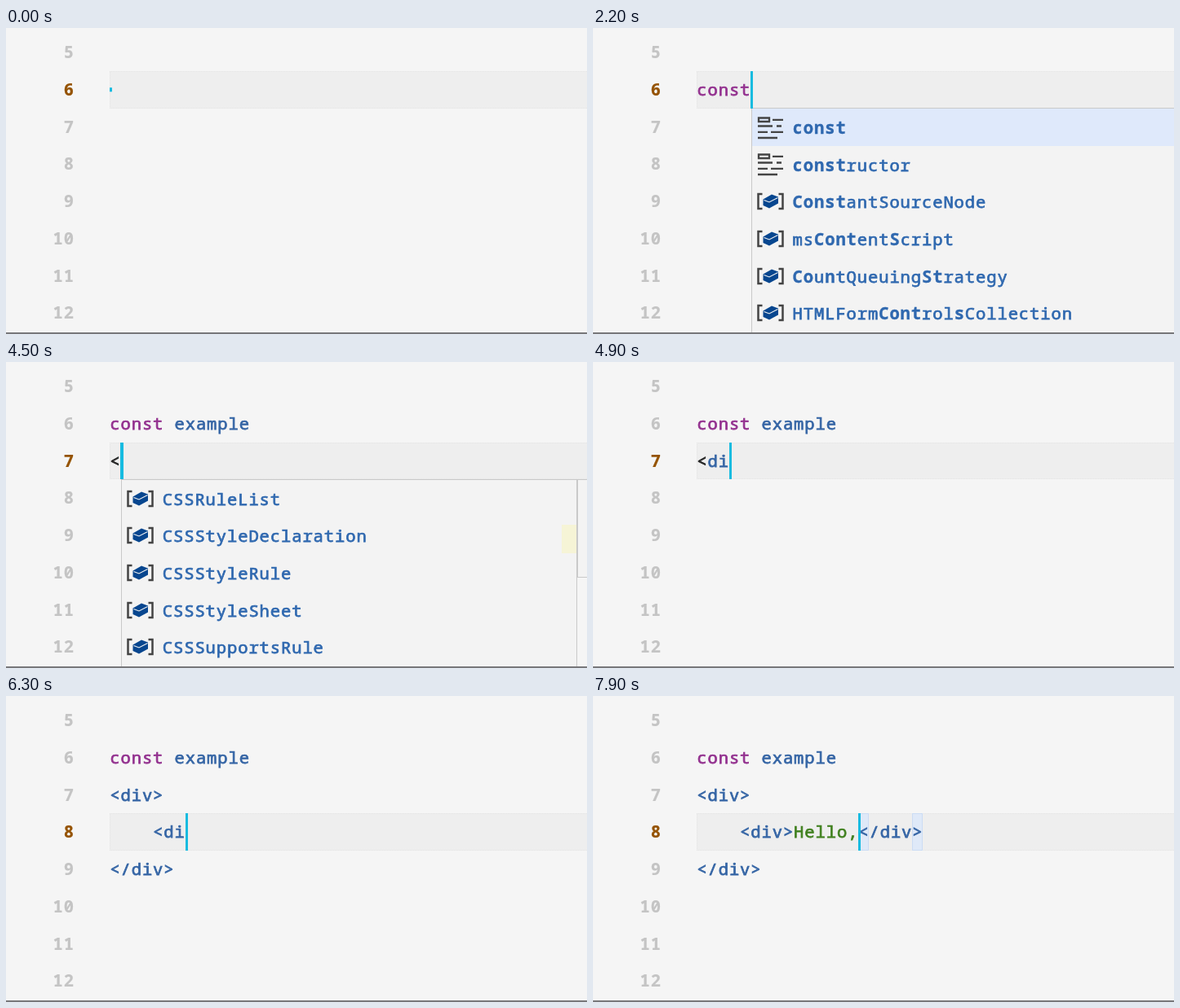
Write an HTML page that moves like this. It is 712 px wide and 376 px high and loops after 8000 ms.

```html
<!DOCTYPE html>
<html lang="en">
<head>
<meta charset="utf-8">
<title>Code editor</title>
<style>
html, body { margin: 0; width: 100%; height: 100%; overflow: hidden; background: #f5f5f5; }
#stage { position: relative; width: 712px; height: 376px; overflow: hidden; background: #f5f5f5;
  font: 500 20.5px/45.7px "Noto Sans Mono", "DejaVu Sans Mono", monospace; letter-spacing: .9px;
  font-variant-ligatures: none; }
#stage div, #stage svg { position: absolute; box-sizing: border-box; }
.t { white-space: pre; height: 45.7px; -webkit-text-stroke: .75px currentColor; }
.num { right: 628px; font-weight: 600; color: #c4c4c4; -webkit-text-stroke-width: .2px; }
.num.on { color: #955300; }
.row { left: 127px; right: 0; height: 45.7px; background: #eee;
  border: dotted #e4e4e4; border-width: 1px 0 1px 1px; }
.cur { width: 3.3px; height: 45.5px; background: #16bbe0; }
.pair { width: 13.2px; height: 45.7px; background: #dfe9f8; border: 1px solid #cbdcf4; }
.pop { width: 559px; height: 400px; background: #f3f3f3; border: 1px solid #c9c9c9; }
.pick { left: 0; right: 0; top: 0; height: 46px; background: #dfe9fb; }
.pop .t { color: #2f68af; }
.pop b { font-weight: 700; -webkit-text-stroke-width: .35px; }
.note { left: 699px; width: 30px; height: 121px; background: #f3f3f3; border: 1px solid #c9c9c9; border-left-width: 2px; }
.foot { left: 0; top: 374px; width: 712px; height: 2px; background: #77777a; }
.k { color: #93318f; } .v { color: #3565a5; } .s { color: #40801f; } .p { color: #222; }
</style>
</head>
<body>
<div id="stage"></div>
<script>
const CW = 13.2, LH = 45.7, LEFT = 127, LOOP = 8000;
const stage = document.getElementById('stage');
const rowTop = n => 53 + (n - 6) * LH;
const colX = c => LEFT + c * CW;

const esc = s => s.replace(/</g, '&lt;');
const ink = (cls, s) => `<span class="${cls}">${esc(s)}</span>`;
const box = (cls, x, y, body = '', extra = '') =>
  `<div class="${cls}" style="left:${x}px;top:${y}px;${extra}">${body}</div>`;

const icons = {
  cube: `<path d="M14.5 1 27 8v15l-12.500 8L2 23V8zM2 8l12.500 7.500L27 8M14.500 15.500V31"
    fill="none" stroke="#55167f" stroke-width="2.4" stroke-linejoin="round"/>`,
  brick: `<path d="M6.500 7H1.500V25H6.500M26.500 7H31.500V25H26.500" fill="none" stroke="#444" stroke-width="2.5"/>
    <path d="M7.500 13.500 18 7.500 26 10.500v8L15 24.500 7.500 21z" fill="#07468f"/>
    <path d="M8.500 14.500 15 17 25.500 11.500" fill="none" stroke="#f3f3f3" stroke-width="1.1"/>`,
  lines: `<path d="M2 4.500H15V9H2zM19 6.800H32M1 14.500H19M24 14.500H30M1 21.800H13M17 21.800H32M1 29H25"
    fill="none" stroke="#444" stroke-width="2.3"/>`
};

// Each list row: icon, then a label with *matched* letters.
const lists = {
  co: ['cube *co*nfirm', 'brick *co*nsole', 'lines *co*nst', 'lines *co*nstructor', 'lines *co*ntinue', 'brick *Co*mment'],
  con: ['cube *con*firm', 'brick *con*sole', 'lines *con*st', 'lines *con*structor', 'lines *con*tinue', 'brick *Con*stantSourceNode'],
  const: ['lines *const*', 'lines *const*ructor', 'brick *Const*antSourceNode', 'brick ms*Cont*ent*S*cript',
    'brick *Co*u*n*tQueuing*St*rategy', 'brick HTMLForm*Cont*rol*s*Collection'],
  cons: ['brick *cons*ole', 'lines *cons*t', 'lines *cons*tructor', 'brick *Cons*tantSourceNode',
    'brick ms*Con*tent*S*cript', 'brick *Co*u*n*tQueuing*S*trategy'],
  css: ['brick CSSRuleList', 'brick CSSStyleDeclaration', 'brick CSSStyleRule', 'brick CSSStyleSheet', 'brick CSSSupportsRule']
};

function popup(name, line, col) {
  const items = lists[name].map((item, i) => {
    const [icon, label] = item.split(' ');
    const y = i * LH;
    return `<svg width="33" height="33" style="left:6.5px;top:${y + 6.5}px">${icons[icon]}</svg>` +
      box('t', 50, y + .6, label.replace(/\*(.+?)\*/g, '<b>$1</b>'));
  });
  const pick = name === 'css' ? '' : '<div class="pick"></div>';
  return box('pop', colX(col) + .6, rowTop(line + 1) - .4, pick + items.join(''));
}

function squiggle(line, col, n) {
  const w = n * CW, y = rowTop(line + 1) - 6;
  let d = 'M0 4';
  for (let x = 0; x <= w; x++) d += `L${x} ${(4 + 2 * Math.cos(x / CW * 2 * Math.PI)).toFixed(1)}`;
  return `<svg width="${w}" height="8" style="left:${colX(col)}px;top:${y}px">
    <path d="${d}" fill="none" stroke="#bd3428" stroke-width="1.7"/></svg>`;
}

const decl = ink('k', 'const') + ink('v', ' example');
const open = ink('v', '<div>'), close = ink('v', '</div>');
const inner = s => ({ 6: decl, 7: open, 8: '    ' + s, 9: close });
const hello = (s, at, more = {}) => [at, 8, 9 + s.length,
  inner(open + ink('s', s) + close), { pairs: [9 + s.length, 14 + s.length], ...more }];
const name = (s, at) => [at, 6, 6 + s.length, { 6: ink('k', 'const') + ink('v', ' ' + s) }];
const tag = (s, at, more) => [at, 7, 1 + s.length, { 6: decl, 7: ink('p', '<') + ink('v', s) }, more];
const nested = (s, at, more) => [at, 8, 4 + s.length, inner(ink('v', s)), more];

// start, cursor line, cursor column, code by line, extras
const steps = [
  [0, 6, 0, {}],
  [1500, 6, 1, { 6: ink('v', 'c') }],
  [1600, 6, 2, { 6: ink('v', 'co') }],
  [1700, 6, 2, { 6: ink('v', 'co') }, { list: 'co', mark: [695, 100, 17, 86, '#f5f04f'] }],
  [1900, 6, 3, { 6: ink('v', 'con') }, { list: 'con' }],
  [2000, 6, 4, { 6: ink('v', 'cons') }, { list: 'cons' }],
  [2100, 6, 5, { 6: ink('v', 'const') }, { list: 'const' }],
  [2200, 6, 5, { 6: ink('k', 'const') }, { list: 'const' }],
  name('', 2600), name('ex', 2800), name('exa', 2900),
  name('exam', 3100), name('exampl', 3200), name('example ', 3400),
  [4000, 7, 0, { 6: decl }],
  tag('', 4500, { list: 'css', note: true, mark: [681, 200, 18, 35, '#f6f4d6'] }),
  tag('', 4600, { list: 'css', note: true }),
  tag('d', 4700), tag('di', 4800), tag('div', 5000),
  [5200, 7, 5, { 6: decl, 7: open + close }, { pairs: [5, 10] }],
  [5600, 8, 4, inner('')],
  nested('<', 6000, { list: 'css' }),
  nested('<d', 6200), nested('<di', 6300), nested('<div', 6500),
  nested('<div', 6700, { wavy: true }),
  nested('<div>', 6900, { pairs: [4, 8], wavy: true }),
  hello('', 7000, { wavy: true }), hello('', 7200),
  hello('H', 7500), hello('He', 7600), hello('Hel', 7700), hello('Hello', 7800), hello('Hello,', 7900)
];

function view([, line, col, code, more = {}]) {
  let out = box('row', LEFT, rowTop(line));
  for (let n = 5; n <= 12; n++)
    out += `<div class="t num${n === line ? ' on' : ''}" style="top:${rowTop(n)}px">${n}</div>`;
  for (const c of more.pairs || []) out += box('pair', colX(c), rowTop(line));
  for (const n in code) out += box('t', LEFT + .3, rowTop(+n), code[n]);
  if (more.wavy) out += squiggle(7, 1, 3) + squiggle(9, 0, 2);
  if (more.list) out += popup(more.list, line, col);
  if (more.note) out += box('note', 699, rowTop(line + 1) - .4);
  if (more.mark) {
    const [x, y, w, h, color] = more.mark;
    out += box('', x, y, '', `width:${w}px;height:${h}px;background:${color}`);
  }
  return out + box('cur', colX(col) + .1, rowTop(line)) + '<div class="foot"></div>';
}

// Blink: the bar grows and shrinks in eased 100 ms steps.
function barScale(t) {
  if (t >= 1500) return 1;
  const k = Math.floor(t % 1000 / 100);
  const u = k < 5 ? Math.min(k, 4) / 4 : 1 - Math.min(k - 5, 4) / 4;
  return .11 + .89 * (.5 - .5 * Math.cos(Math.PI * u));
}

let shown = -1;
function draw(t) {
  let i = steps.length - 1;
  while (steps[i][0] > t) i--;
  if (i !== shown) stage.innerHTML = view(steps[shown = i]);
  stage.querySelector('.cur').style.transform = `scaleY(${barScale(t)})`;
}

const start = performance.now();
function tick() {
  draw((performance.now() - start) % LOOP);
  requestAnimationFrame(tick);
}
tick();
</script>
</body>
</html>
```
